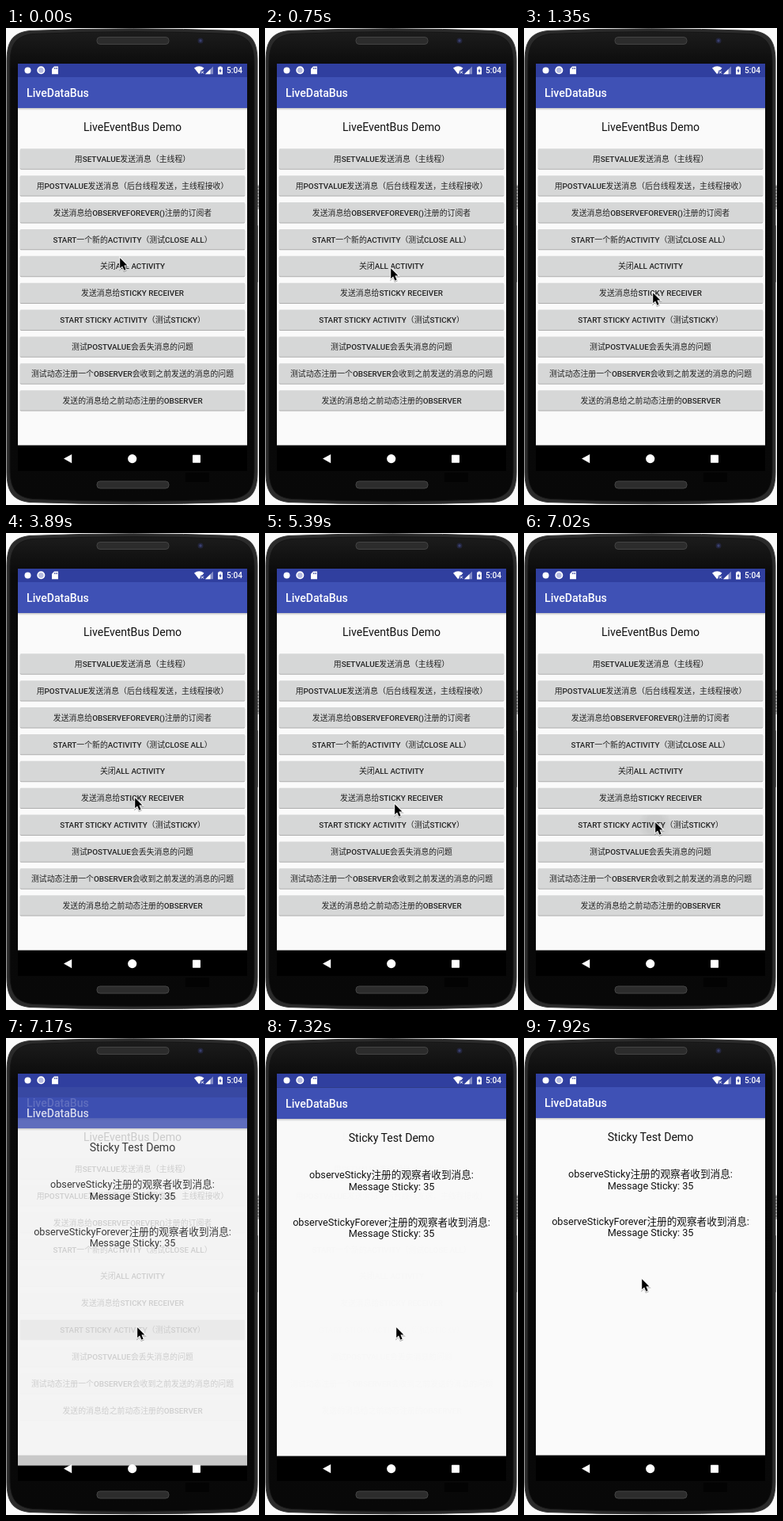
An HTML page that plays this animation: 320x602 px, repeating every 8000 ms.

```html
<!DOCTYPE html>
<html lang="zh-CN">
<head>
<meta charset="utf-8">
<title>LiveEventBus Demo</title>
<style>
  html, body { margin: 0; width: 100%; height: 100%; overflow: hidden; background: #fafafa; }
  svg { display: block; width: 320px; height: 602px; }
  text { font-family: Roboto, "Noto Sans CJK SC", "Noto Sans CJK", sans-serif; fill: #111; }
  .mid text { text-anchor: middle; }
  .bar { font-size: 14.1px; font-weight: 500; fill: #fff; }
  .head { font-size: 14.1px; }
  .msg { font-size: 12.65px; }
  .label { font-size: 9.88px; font-weight: 500; fill: #222; }
  .clock { font-size: 10.1px; font-weight: 500; fill: #fff; }
  .btn { fill: #d6d7d7; filter: drop-shadow(0 1px .7px rgba(0, 0, 0, .3)); }
  #cursor path { stroke: #fff; stroke-width: 1.9; paint-order: stroke; filter: drop-shadow(0 1px .6px rgba(0, 0, 0, .35)); }
  #next, .press { opacity: 0; }
</style>
</head>
<body>
<svg viewBox="0 0 320 602" xmlns="http://www.w3.org/2000/svg">
  <defs>
    <linearGradient id="shade" x2="0" y2="1">
      <stop stop-color="#000" stop-opacity=".22"/>
      <stop offset="1" stop-color="#000" stop-opacity="0"/>
    </linearGradient>
    <linearGradient id="shell" x2="0" y2="1">
      <stop stop-color="#1c1c1c"/>
      <stop offset=".08" stop-color="#0a0a0a"/>
      <stop offset="1" stop-color="#080808"/>
    </linearGradient>
    <radialGradient id="ink">
      <stop offset=".5"/>
      <stop offset="1" stop-opacity="0"/>
    </radialGradient>
    <clipPath id="stickyClip"><rect x="17.8" y="321.6" width="284.4" height="25.4" rx="1.4"/></clipPath>
    <clipPath id="startClip"><rect x="17.8" y="355.5" width="284.4" height="25.4" rx="1.4"/></clipPath>
  </defs>

  <!-- phone body -->
  <rect x="316" y="198" width="4" height="31" rx="1" fill="#b0b0b0"/>
  <path d="M318.5 200V228" stroke="#555" stroke-width="2" stroke-dasharray="1.5 2.5"/>
  <rect x="316" y="249" width="3" height="72" rx="1" fill="#777"/>
  <path d="M1 42C1 17 8 6 30 3.500Q160 -2 289 3.500C311 6 318 17 318 42V560C318 585 311 596 289 598.500Q160 603 30 598.500C8 596 1 585 1 560Z" fill="#2a2a2a" stroke="#3a3a3a"/>
  <path d="M5 46C5 21 12 10 34 7.500Q160 2 285 7.500C307 10 314 21 314 46V556C314 581 307 592 285 594.500Q160 600 34 594.500C12 592 5 581 5 556Z" fill="url(#shell)" stroke="#151515"/>
  <rect x="115" y="11.500" width="91" height="9" rx="4" fill="#2c2c2c" stroke="#444"/>
  <rect x="115" y="572" width="91" height="9" rx="4" fill="#2c2c2c" stroke="#444"/>
  <circle cx="246" cy="16" r="3.500" fill="#22243a"/>
  <circle cx="246" cy="16" r="1.700" fill="#3a4070"/>
  <rect x="15" y="45" width="290" height="514" fill="#000"/>
  <rect x="227" y="561" width="30" height="12" fill="#030303"/>

  <g id="main" class="mid"></g>
  <g id="next" class="mid"></g>

  <!-- status bar -->
  <rect x="15" y="45" width="290" height="17" fill="#303f9f"/>
  <circle cx="27.500" cy="53.500" r="4" fill="#fff"/>
  <circle cx="44.300" cy="53.300" r="4.200" fill="#b5bbe0" stroke="#fff" stroke-width="1.700"/>
  <path d="M61 48.500H66V58.200H58V51.500Z" fill="#fff"/>
  <path d="M61.300 50V52M63 50V52M64.600 50V52" stroke="#303f9f" stroke-width=".8"/>
  <path d="M238 50.500Q244.200 46 250.500 50.500L244.200 58.300Z" fill="#fff"/>
  <path d="M246.300 53.800L250.500 58M250.500 53.800L246.300 58" stroke="#303f9f" stroke-width="2.600"/>
  <path d="M246.800 54.300L250 57.500M250 54.300L246.800 57.500" stroke="#fff"/>
  <path d="M252 58.200L262 48.500V58.200Z" fill="#fff" opacity=".4"/>
  <path d="M252 58.200L258.500 52V58.200Z" fill="#fff"/>
  <path d="M268 49.500H269.500V48.500H272.500V49.500H274V58.500H268Z" fill="#fff"/>
  <path d="M271.500 51L269.300 54.500H270.700V57L272.800 53.500H271.500Z" fill="#303f9f"/>
  <text class="clock" x="279" y="57">5:04</text>

  <!-- navigation -->
  <g fill="#fff">
    <path d="M73 543.500L83.200 538V549.300Z"/>
    <circle cx="159.700" cy="543.600" r="5.600"/>
    <rect x="236" y="538.700" width="10" height="10" rx=".6"/>
  </g>

  <g id="cursor"><path d="M2.200 1.300V14.200L5.100 11.500L7.400 16.700L9.600 15.800L7.400 10.600H11.400Z"/></g>
</svg>
<script>
const LOOP = 8000;
const $ = id => document.getElementById(id);

const labels = [
  "用SETVALUE发送消息（主线程）",
  "用POSTVALUE发送消息（后台线程发送，主线程接收）",
  "发送消息给OBSERVEFOREVER()注册的订阅者",
  "START一个新的ACTIVITY（测试CLOSE ALL）",
  "关闭ALL ACTIVITY",
  "发送消息给STICKY RECEIVER",
  "START STICKY ACTIVITY（测试STICKY）",
  "测试POSTVALUE会丢失消息的问题",
  "测试动态注册一个OBSERVER会收到之前发送的消息的问题",
  "发送的消息给之前动态注册的OBSERVER"
];

const line = (cls, y, s) => `<text class="${cls}" x="160" y="${y}">${s}</text>`;

const page = (title, body) => `
  <rect x="15" y="62" width="290" height="464.6" fill="#fafafa"/>
  <rect x="15" y="101" width="290" height="3" fill="url(#shade)"/>
  <rect x="15" y="62" width="290" height="39" fill="#3f51b5"/>
  <text class="bar" x="26" y="87" style="text-anchor:start">LiveDataBus</text>
  ${line("head", 130, title)}${body}`;

const rowY = i => 152.3 + i * 33.87;
const buttons = labels.map((_, i) =>
  `<rect class="btn" x="17.8" y="${rowY(i)}" width="284.4" height="25.4" rx="1.4"/>`).join("");
const presses = `
  <g clip-path="url(#stickyClip)" fill="url(#ink)">
    <circle class="press" id="tapSmall" cx="163" cy="336" r="10"/>
    <circle class="press" id="tapWide" cx="157" cy="337" r="32"/>
  </g>
  <g clip-path="url(#startClip)">
    <circle class="press" id="tapStart" cx="165.5" cy="368" r="22" fill="url(#ink)"/>
    <rect class="press" id="held" x="17" y="355" width="286" height="27"/>
  </g>`;
const captions = labels.map((s, i) => line("label", rowY(i) + 16.7, s)).join("");

$("main").innerHTML = page("LiveEventBus Demo", `<g id="buttons">${buttons}</g>` + presses + captions);
$("next").innerHTML = page("Sticky Test Demo",
  line("msg", 175.7, "observeSticky注册的观察者收到消息:") +
  line("msg", 190.5, "Message Sticky: 35") +
  line("msg", 235.5, "observeStickyForever注册的观察者收到消息:") +
  line("msg", 250.3, "Message Sticky: 35"));

// Each row is [time, value]; the value holds until the next row.
function hold(id, prop, rows) {
  const last = rows[rows.length - 1][1];
  const frames = [...rows, [LOOP, last]].map(([t, v]) =>
    ({ offset: t / LOOP, [prop]: v, easing: "steps(1, end)" }));
  $(id).animate(frames, { duration: LOOP, iterations: Infinity });
}
const at = (x, y) => `translate(${x}px, ${y}px)`;
const flash = (id, from, to, alpha) => hold(id, "opacity", [[0, 0], [from, alpha], [to, 0]]);

hold("cursor", "transform", [
  [0, 142, 289], [300, 144, 294], [450, 149, 298], [600, 155, 300],
  [750, 157, 302], [900, 157, 304], [1050, 160, 321], [1200, 161, 330],
  [1350, 161, 333], [5390, 162, 341], [5530, 163, 350], [5680, 164, 360],
  [5830, 164, 363], [5980, 164, 364], [7920, 147, 303]
].map(([t, x, y]) => [t, at(x, y)]));

flash("tapSmall", 3890, 4040, .05);
flash("tapWide", 4040, 4340, .03);
flash("tapStart", 7020, 7170, .05);
flash("held", 7170, 7470, .2);

hold("buttons", "opacity", [[0, 1], [7170, .25]]);
hold("main", "opacity", [[0, 1], [7170, .9], [7320, .75], [7470, 0]]);
hold("next", "opacity", [[0, 0], [7170, .8], [7320, .99], [7470, 1]]);
hold("next", "transform", [[0, at(0, 13)], [7320, at(0, 1)], [7470, at(0, 0)]]);
</script>
</body>
</html>
```
